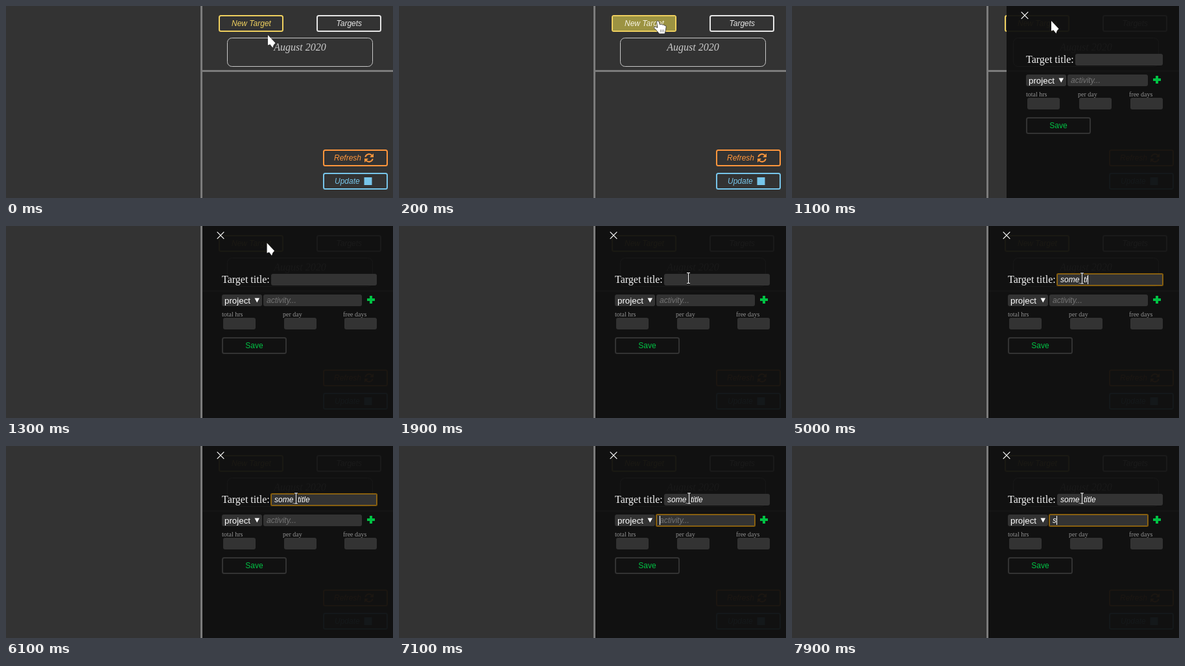
An HTML page that plays this animation: 597 by 297 pixels, repeating every 8000 ms.

```html
<!DOCTYPE html>
<html lang="en">
<head>
<meta charset="utf-8">
<title>New target form</title>
<style>
  html, body { margin: 0; width: 100%; height: 100%; overflow: hidden; background: #333; }
  svg { display: block; width: 597px; height: 297px; --d: 0px; }
  text { font-family: "Liberation Sans", Arial, sans-serif; font-size: 12px; white-space: pre; }
  .it { font-style: italic; }
  .serif { font-family: "Liberation Serif", "Times New Roman", serif; }
  .btn rect { fill: none; stroke-width: 2; }
  .btn text { font-style: italic; }
  .yellow { --c: #efd05f; }
  .white { --c: #e6e6e6; }
  .orange { --c: #ff963c; }
  .blue { --c: #77c5ea; }
  .btn rect { stroke: var(--c); }
  .btn text { fill: var(--c); }
  .field { fill: #333; }
  .slide { transform: translateX(var(--d)); }
  .half { transform: translateX(calc(var(--d) / 2)); }
  #back { x: calc(303px + var(--d)); width: calc(294px - var(--d)); }
  .title { x: calc(409px + var(--d)); width: calc(163px - var(--d)); }
  .activity { x: calc(397px + var(--d)); width: calc(152px - var(--d)); }
  .ring { fill: none; stroke: #e59700; stroke-opacity: .52; stroke-width: 2; }
  .label { font-size: 10px; fill: #929292; }
  .typed { fill: #fff; font-style: italic; }
  .green { fill: #00c244; }
</style>
</head>
<body>
<svg viewBox="0 0 597 297">
  <rect width="597" height="297" fill="#333"/>
  <path d="M300 0h3v297h-3zM303 99h294v3H303z" fill="#7b7b7b"/>

  <g class="btn yellow">
    <rect x="329" y="15" width="98" height="24" rx="2.5"/>
    <path id="hover" d="M330 16h96v22h-96z" fill="#9c9342"/>
    <text id="newText" x="348" y="31">New Target</text>
  </g>
  <g class="btn white">
    <rect x="480" y="15" width="98" height="24" rx="2.5"/>
    <text x="509.5" y="31">Targets</text>
  </g>
  <rect x="341.5" y="49.5" width="224" height="44" rx="7" fill="none" stroke="#c8c8c8"/>
  <text class="serif it" x="453.5" y="69" text-anchor="middle" style="font-size:16px" fill="#ccc">August 2020</text>
  <g class="btn orange">
    <rect x="490" y="223" width="98" height="24" rx="2.5"/>
    <text x="506" y="239">Refresh</text>
    <g fill="none" stroke="#ff963c" stroke-width="2">
      <path d="M554.3 233.6a5.8 5.8 0 0 1 10.3-2.2M565.7 236.4a5.8 5.8 0 0 1-10.3 2.2"/>
    </g>
    <path d="M567 228v6h-6zM553 242v-6h6z" fill="#ff963c"/>
  </g>
  <g class="btn blue">
    <rect x="490" y="259" width="98" height="24" rx="2.5"/>
    <text x="507" y="275">Update</text>
    <path d="M552.5 265h12v12h-12z" fill="#77c5ea"/>
  </g>

  <g id="panel">
    <rect id="back" y="0" height="297" fill="#0f0f0f" fill-opacity=".95"/>
    <rect class="field title" y="74" height="18" rx="3"/>
    <rect class="field activity" y="106" height="18" rx="3"/>
    <rect class="field" x="522" y="142" width="50" height="18" rx="3"/>
    <text class="serif label" x="520" y="140">free days</text>
    <path class="green" d="M561 108h4v4h4v4h-4v4h-4v-4h-4v-4h4z"/>
    <g class="half">
      <rect class="field" x="429" y="142" width="50" height="18" rx="3"/>
      <text class="serif label" x="427" y="140">per day</text>
    </g>
    <g class="slide">
      <path d="M325.7 9.2l10.6 10.6M336.3 9.2l-10.6 10.6" stroke="#fff" stroke-width="1.2"/>
      <text class="serif" x="333" y="88" style="font-size:16px" fill="#f2f2f2">Target title:</text>
      <rect class="field" x="333" y="106" width="62" height="18" rx="3"/>
      <text x="337" y="120" style="font-size:13.333px" fill="#fff">project</text>
      <path d="M383.5 111.5h7.5l-3.75 7z" fill="#fff"/>
      <rect class="field" x="335" y="142" width="50" height="18" rx="3"/>
      <text class="serif label" x="333" y="140">total hrs</text>
      <rect x="334" y="173" width="98" height="24" rx="2.5" fill="none" stroke="#333" stroke-width="2"/>
      <text class="green" x="383" y="189" text-anchor="middle">Save</text>
      <text id="hint" class="it" x="402" y="119" fill="#757575">activity...</text>
    </g>
    <rect id="ringTitle" class="ring title" y="74" height="18" rx="1.5"/>
    <rect id="ringProject" class="ring" x="333" y="106" width="62" height="18" rx="1.5"/>
    <rect id="ringActivity" class="ring activity" y="106" height="18" rx="1.5"/>
    <text id="titleText" class="typed" x="414" y="87"></text>
    <text id="activityText" class="typed" x="402" y="119"></text>
    <rect id="caret" width="1" height="14" fill="#fff"/>
  </g>

  <g id="arrow">
    <path d="M0 0V15.5L3.4 14.2L7.4 19.5L8.8 15.2L11.5 12.2Z" fill="#fff"/>
  </g>
  <g id="hand">
    <path d="M-1.5 1.5Q0 -.6 1.8 1.2L3.4 6.3L5.6 5.6L7.4 6.6L9.4 6.4L10.6 7.7Q13 7 13.2 9.5L12.4 15L11 20.5H2.4L-1 16L-5.6 11.6Q-6 9.2 -3.6 9.4L-.2 11Z" fill="#fff" stroke="#222" stroke-width=".8" stroke-linejoin="round"/>
    <path d="M4.6 14v4M6.9 14v4M9.2 14v4" stroke="#555" stroke-width=".7"/>
  </g>
  <g id="beam" fill="none">
    <path d="M-2.5 -8h2l.5 .5l.5 -.5h2M0 -7.5v15M-2.5 8h2l.5 -.5l.5 .5h2" stroke="#111" stroke-width="3"/>
    <path d="M-2.5 -8h2l.5 .5l.5 -.5h2M0 -7.5v15M-2.5 8h2l.5 -.5l.5 .5h2" stroke="#fff" stroke-width="1.2"/>
  </g>
</svg>
<script>
  const LOOP = 8000;
  const $ = id => document.getElementById(id);
  const svg = document.querySelector('svg');
  const show = (id, on) => { $(id).style.display = on ? '' : 'none'; };
  const within = (t, a, b) => t >= a && t < b;

  // [time, characters typed]
  const typing = [[2900, 1], [3300, 2], [3600, 4], [4400, 5], [5000, 7], [5300, 8], [5400, 9], [5500, 10]];
  const caretOff = [[2600, 2900], [4300, 4400], [6100, 7100], [7700, 7900]];

  function pointer(t) {
    if (t < 100) return ['arrow', 404, 45];
    if (t < 200) return ['hand', 401, 27];
    if (t < 1100) return ['hand', 399, 22.5];
    if (t < 1300) return ['arrow', 400, 23];
    if (t >= 2000) return ['beam', 447.5, 81];
    const p = Math.min(1, (t - 1200) / 700);
    const e = p * p * (3 - 2 * p);
    const y = 23 + 57.5 * e;
    return [y > 74 ? 'beam' : 'arrow', 400 + 46.5 * e, y];
  }

  function draw(t) {
    show('panel', t >= 1100);
    svg.style.setProperty('--d', t < 1300 ? '28px' : '0px');

    const over = within(t, 100, 1100);
    $('hover').style.opacity = over ? (t < 200 ? .5 : 1) : 0;
    $('newText').style.fill = over ? '#f6f3e2' : '';

    const [shape, x, y] = pointer(t);
    for (const id of ['arrow', 'hand', 'beam']) show(id, id === shape);
    $(shape).setAttribute('transform', `translate(${x} ${y})`);

    show('ringTitle', within(t, 2100, 6600));
    show('ringProject', within(t, 6600, 7100));
    show('ringActivity', t >= 7100);

    const count = typing.reduce((n, [at, k]) => t >= at ? k : n, 0);
    $('titleText').textContent = 'some_title'.slice(0, count);
    $('activityText').textContent = t >= 7900 ? 's' : '';
    show('hint', t < 7900);

    const lit = t >= 2100 && !caretOff.some(([a, b]) => within(t, a, b));
    show('caret', lit);
    if (lit) {
      const [id, left, top] = t < 7100 ? ['titleText', 414, 76] : ['activityText', 402, 108];
      const text = $(id);
      const width = text.textContent ? text.getComputedTextLength() : 0;
      $('caret').setAttribute('x', Math.round(left + width));
      $('caret').setAttribute('y', top);
    }
  }

  const start = performance.now();
  function tick() {
    const t = (performance.now() - start) % LOOP;
    draw(Math.floor(t / 100) * 100);
    requestAnimationFrame(tick);
  }
  tick();
</script>
</body>
</html>
```
